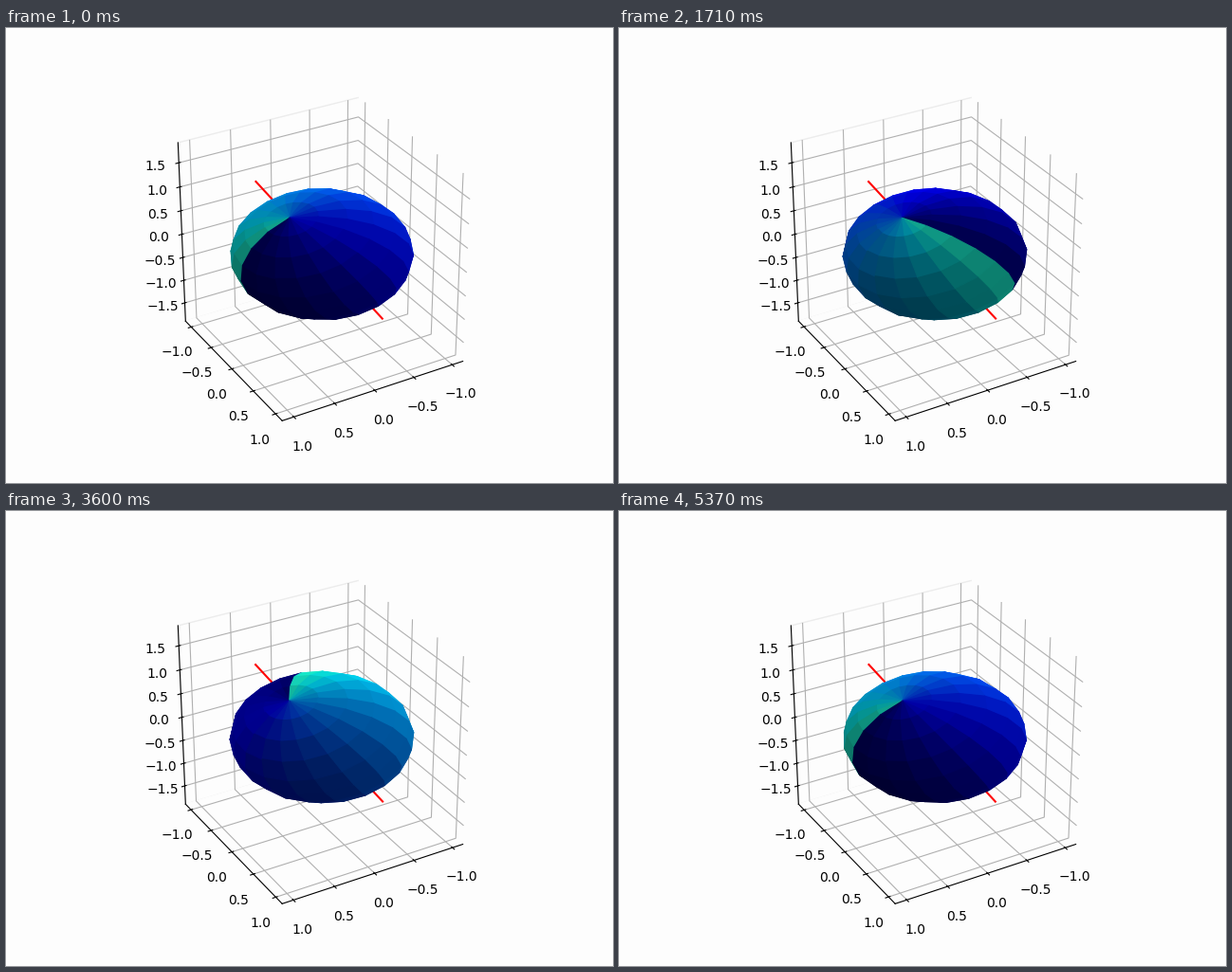
A matplotlib script for the animation above (5400 ms loop, 640x480 px).

```python
import numpy as np
import matplotlib.pyplot as plt
from matplotlib.animation import FuncAnimation

FRAMES, INTERVAL = 180, 30
TILT = np.radians(23.5)
PAPER = "#fdfdfd"
PAD = 25 / 24  # space between data limits and box walls

fig = plt.figure(figsize=(6.4, 4.8), dpi=100, facecolor=PAPER)
ax = fig.add_subplot(projection="3d", facecolor=PAPER)
ax.set_box_aspect((1, 1, 1))
ax.view_init(elev=30, azim=60)
for axis in (ax.xaxis, ax.yaxis, ax.zaxis):
    axis.set_pane_color(PAPER)
ax.yaxis.pane.set_edgecolor("#ececec")

# Longitude runs along rows, polar angle along columns
u, v = np.meshgrid(np.linspace(0, 2 * np.pi, 21), np.linspace(0, np.pi, 11),
                   indexing="ij")
colors = plt.cm.jet(0.4 * u / (2 * np.pi))


def tilt(x, z):
    """Lean points from the z axis towards +x."""
    c, s = np.cos(TILT), np.sin(TILT)
    return c * x + s * z, c * z - s * x


ends = np.array([-2.0, 2.0])
line_x, line_z = tilt(0 * ends, ends)
ax.plot(line_x, 0 * ends, line_z, color="red")

surface = None


def draw(i):
    global surface
    if surface is not None:
        surface.remove()
    lon = u + 2 * np.pi * i / FRAMES
    x, z = tilt(np.sin(v) * np.cos(lon), np.cos(v))
    y = np.sin(v) * np.sin(lon)
    surface = ax.plot_surface(x, y, z, facecolors=colors)
    # Limits follow the facets as they turn
    rx, ry = (1.1 * PAD * np.abs(a).max() for a in (x, y))
    rz = PAD * line_z.max()
    ax.set(xlim=(-rx, rx), ylim=(-ry, ry), zlim=(-rz, rz))
    return surface,


anim = FuncAnimation(fig, draw, frames=FRAMES, interval=INTERVAL,
                     init_func=lambda: draw(0), repeat=True, repeat_delay=0)
plt.show()
```
